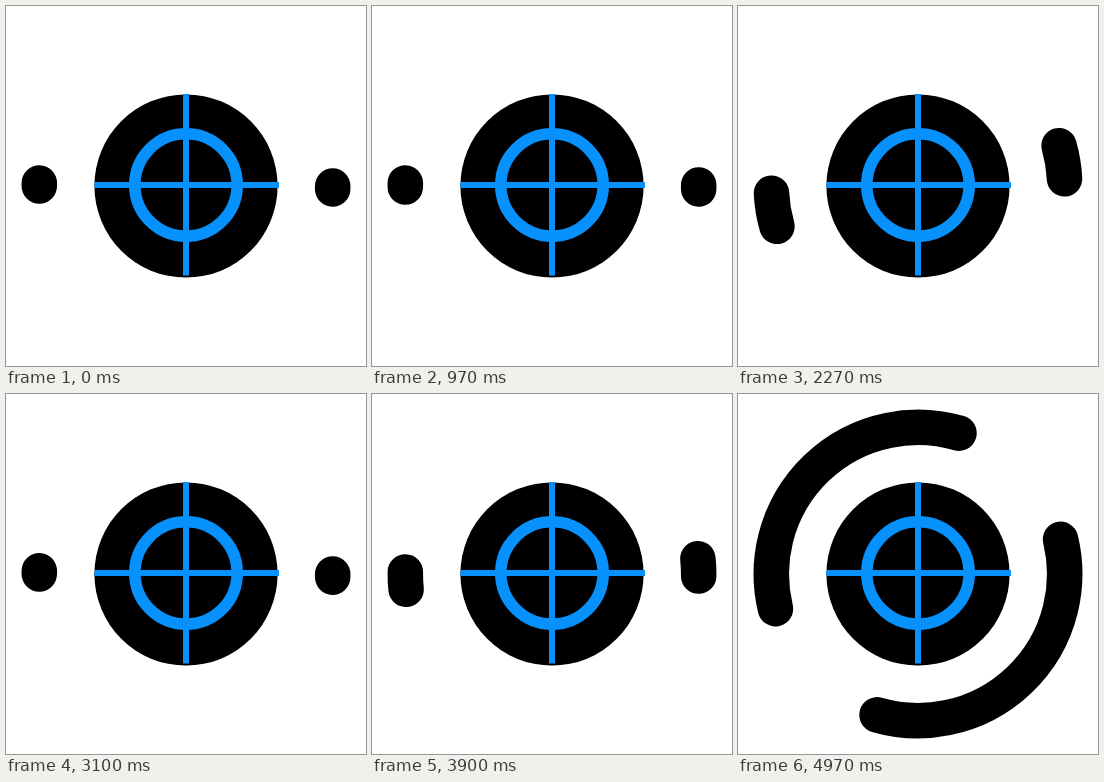
These frames come from a looping animation (360x360 px, 5000 ms). An HTML page:

```html
<!DOCTYPE html>
<html>
<head>
<meta charset="utf-8">
<style>
  html, body { margin: 0; height: 100%; overflow: hidden; background: #fff; }
  svg { display: block; width: 100vw; height: 100vh; }
</style>
</head>
<body>
<svg viewBox="0 0 360 360" fill="none">
  <circle cx="180" cy="180" r="91.6" fill="#000"/>
  <g stroke="#0691fc">
    <circle cx="180" cy="179" r="51.2" stroke-width="11.6"/>
    <path d="M88.5 179H273M180 88V269.5" stroke-width="6"/>
  </g>
  <path id="arcs" stroke="#000" stroke-width="35.5" stroke-linecap="round"/>
</svg>
<script>
  const FPS = 30, LOOP = 5000, CYCLE = 46;
  const RADIUS = 146.7, REST_LENGTH = 1.2;
  const arcs = document.getElementById('arcs');

  // cubic-bezier(x1, 0, 0, 1), solved for x by bisection
  function ease(x, x1) {
    if (x <= 0) return 0;
    if (x >= 1) return 1;
    let lo = 0, hi = 1;
    for (let i = 0; i < 24; i++) {
      const t = (lo + hi) / 2;
      if (3 * (1 - t) ** 2 * t * x1 + t ** 3 < x) lo = t; else hi = t;
    }
    return lo * lo * (3 - 2 * lo);
  }

  // Degrees run clockwise from the left
  function point(deg) {
    const a = (deg + 180) * Math.PI / 180;
    return (180 + RADIUS * Math.cos(a)).toFixed(2) + ' ' + (180 + RADIUS * Math.sin(a)).toFixed(2);
  }

  function arc(from, to) {
    const large = to - from > 180 ? 1 : 0;
    return `M${point(from)}A${RADIUS} ${RADIUS} 0 ${large} 1 ${point(to)}`;
  }

  function draw() {
    const time = performance.now() % LOOP;
    const step = Math.floor((time + 3.4) * FPS / 1000) % (LOOP * FPS / 1000) % CYCLE;
    const head = 360 * ease((step - 0.9) / 25.5, 0.24) + REST_LENGTH;
    const tail = 360 * ease((step - 3.55) / 27, 0.43);
    arcs.setAttribute('d', arc(tail, head) + arc(tail + 180, head + 180));
    requestAnimationFrame(draw);
  }
  draw();
</script>
</body>
</html>
```
